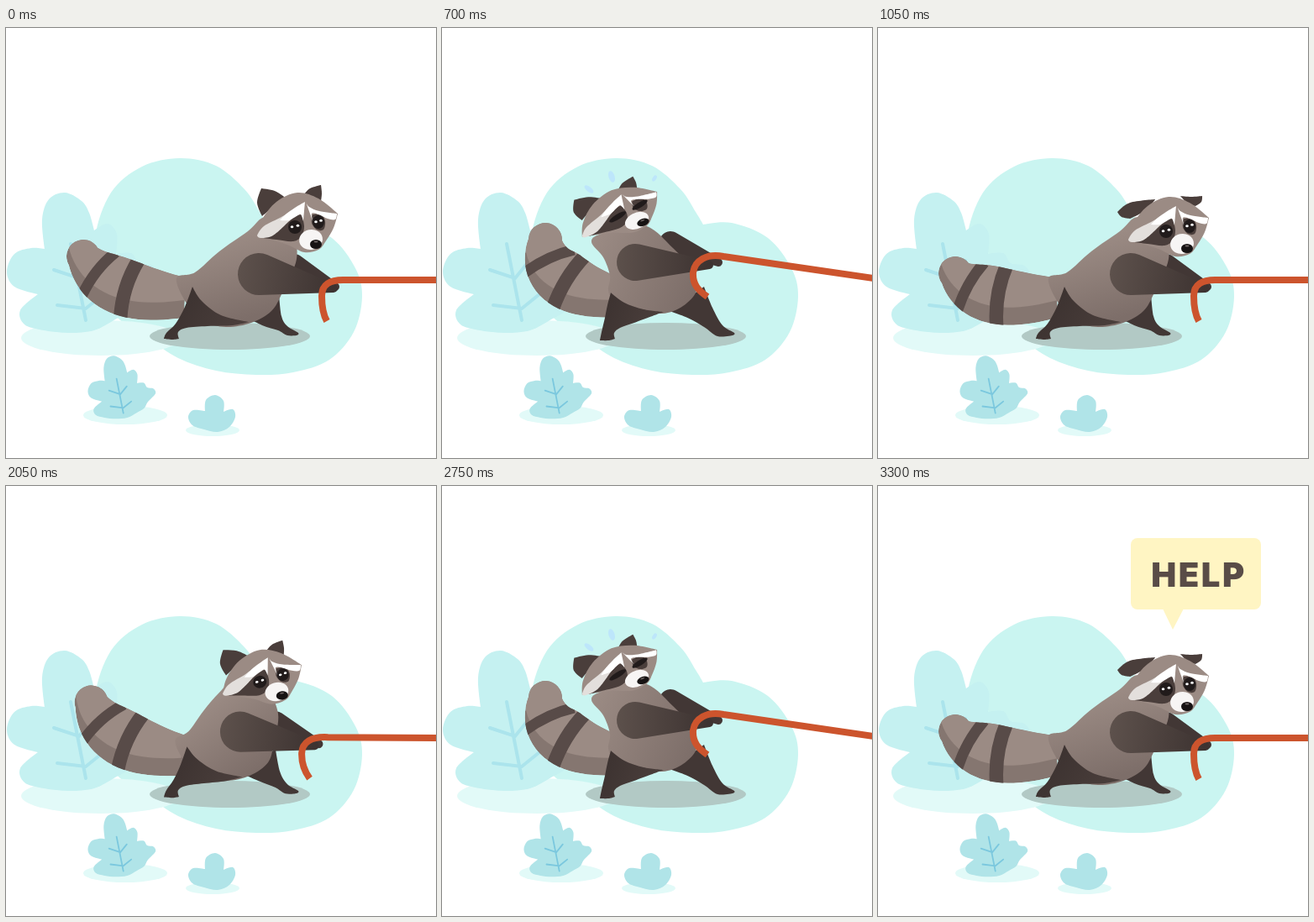
These frames come from a looping animation (512 px wide and 512 px high, 4.3 s). An HTML page with a canvas:

```html
<!DOCTYPE html>
<html lang="en">
<head>
<meta charset="utf-8">
<title>Tug of rope</title>
<style>
html, body { margin: 0; width: 100%; height: 100%; overflow: hidden; background: #fff; }
canvas { display: block; width: 100vw; height: 100vh; }
</style>
</head>
<body>
<canvas id="stage" width="512" height="512"></canvas>
<script>
const SIZE = 512, LOOP = 4300, SECOND_PULL = 2050;
const stage = document.getElementById('stage').getContext('2d');
const layer = document.createElement('canvas');
layer.width = layer.height = SIZE;
const actor = layer.getContext('2d');

const FUR = '#9b8b84', SHADE = '#857670', DARK = '#423735', STRIPE = '#584b48';
const MASK = '#4a3e3b', MIST = '#e2faf8', LEAF = '#b0e4e8', ROPE = '#cc542d';

const clamp = v => Math.max(0, Math.min(1, v));
const lerp = (a, b, t) => a + (b - a) * t;

// "x,y" is a smooth point, "x,y!" a sharp one
const parse = s => s.split(' ').map(w => {
  const [x, y] = w.split(',');
  return { x: parseFloat(x), y: parseFloat(y), sharp: w.endsWith('!') };
});
const poses = (...list) => list.map(parse);
const blend = ([a, b], tx, ty = tx) =>
  a.map((p, i) => ({ x: lerp(p.x, b[i].x, tx), y: lerp(p.y, b[i].y, ty), sharp: p.sharp }));

function spline(pts) {
  const path = new Path2D(), n = pts.length;
  const handle = (i, dir) => {
    const p = pts[i], a = pts[(i + n - 1) % n], b = pts[(i + 1) % n];
    const k = p.sharp ? 0 : dir / 6;
    return [p.x + (b.x - a.x) * k, p.y + (b.y - a.y) * k];
  };
  path.moveTo(pts[0].x, pts[0].y);
  for (let i = 0; i < n; i++) {
    const j = (i + 1) % n;
    path.bezierCurveTo(...handle(i, 1), ...handle(j, -1), pts[j].x, pts[j].y);
  }
  path.closePath();
  return path;
}
function fill(c, pts, color) {
  c.fillStyle = color;
  c.fill(spline(pts));
}
function oval(c, x, y, rx, ry, color, turn = 0) {
  c.fillStyle = color;
  c.beginPath();
  c.ellipse(x, y, rx, ry, turn, 0, Math.PI * 2);
  c.fill();
}
function fade(c, a, b, from, to) {
  const grad = c.createLinearGradient(a.x, a.y, b.x, b.y);
  grad.addColorStop(0, from);
  grad.addColorStop(1, to);
  return grad;
}
// tapered capsule from circle a (radius ra) to circle b (radius rb)
function limb(c, a, ra, b, rb, color) {
  const dir = Math.atan2(b.y - a.y, b.x - a.x);
  const open = Math.acos((ra - rb) / Math.hypot(b.x - a.x, b.y - a.y));
  c.fillStyle = color;
  c.beginPath();
  c.arc(a.x, a.y, ra, dir + open, dir - open);
  c.arc(b.x, b.y, rb, dir - open, dir + open);
  c.fill();
}

// Scenery
const blob = parse('207,155 250,164 284,192 302,219 311,234! 345,232 388,250 416,286 424,320 414,362 385,395 342,410 298,413 250,408 205,393 168,368 130,342 112,300 106,250 125,196 162,165');
const leaf = parse('70,196 90,206 99,220 105,241! 121,233 132,245 131,269! 149,268 158,280 174,283 180,296 160,318 150,335 130,347 105,360 75,363 45,360 22,353 17,336 38,317! 10,308 1,290 10,269 30,262 46,263! 43,228 51,204');
const bud = parse('249,437 259,444 259,457! 270,454 273,463 266,475 252,481 236,478 222,473 217,463 223,455 237,456! 238,443');
const veins = new Path2D('M77 257L95 348M57 288L87 298L104 277M61 330L95 334L116 317');

function drawLeaf(c, x, y, scale, color, veinColor) {
  c.save();
  c.translate(x, y);
  c.scale(scale, scale);
  fill(c, leaf, color);
  c.strokeStyle = veinColor;
  c.lineWidth = 4;
  c.lineCap = 'round';
  c.stroke(veins);
  c.restore();
}
function scenery(c) {
  c.fillStyle = '#fff';
  c.fillRect(0, 0, SIZE, SIZE);
  fill(c, blob, '#caf5f1');
  oval(c, 113, 369, 95, 21, MIST);
  drawLeaf(c, 0, 0, 1, '#c5f1f1', '#abe4ec');
  oval(c, 142, 461, 50, 11, MIST);
  drawLeaf(c, 97, 302, 0.45, LEAF, '#7bc8de');
  oval(c, 246, 479, 32, 7, MIST);
  fill(c, bud, LEAF);
  oval(c, 266.5, 367, 95.5, 16, '#b2c9c5');
}

// Raccoon: each part has a resting and a leaning pose
const spine = poses('92,292 119,328 213,321', '123,252 120,307 208,321');
const body = poses(
  '203,298 225,291 254,266 288,242 310,225 340,245 346,275 329,315 316,337 292,351 262,356 235,349 215,328',
  '198,312 200,295 192,273 178,255 190,245 240,235 275,262 296,287 303,312 287,331 262,340 230,333 204,322');
const nearLeg = poses(
  '222,308! 233,325 256,342 289,350! 270,354 240,355 215,357 205,362 206,370! 198,371 188,370! 191,363 202,352 213,332',
  '201,315! 217,327 240,335 264,338! 245,345 226,352 212,357 205,363 206,370! 199,372 188,372! 190,362 194,345 197,330');
const farLeg = poses(
  '282,342! 300,330 325,316! 328,343 335,355 348,363 346,366! 335,366 324,360 305,354',
  '256,332! 285,325 312,308! 322,333 334,354 348,363 346,366! 328,367 312,356 290,344');
const arms = poses('301,293 390,310 343,282 392,308', '230,279 318,282 272,255 329,279');
const rope = poses(
  '514,300 405,300 385,299 376,306 376,319 376,331 377,340 382,349',
  '514,298 335,272 315,268 301,277 299,291 298,306 306,313 316,320');

// pose: 0 resting, 1 ears up, 2 starting to pull, 3 leaning right back
const lean = pose => pose < 2 ? 0.31 * clamp(pose - 1) : lerp(0.31, 1, pose - 2);

function drawTail(c, pose) {
  const [tip, mid, base] = blend(spine, lean(pose), Math.sin(pose * Math.PI / 6));
  const edge = (t, side) => {
    const u = 1 - t, r = side * (20 + 4 * t + 12 * Math.sin(Math.PI * t));
    const dx = u * (mid.x - tip.x) + t * (base.x - mid.x);
    const dy = u * (mid.y - tip.y) + t * (base.y - mid.y);
    const len = Math.hypot(dx, dy);
    return [
      u * u * tip.x + 2 * u * t * mid.x + t * t * base.x + r * dy / len,
      u * u * tip.y + 2 * u * t * mid.y + t * t * base.y - r * dx / len
    ];
  };
  const path = new Path2D();
  for (let i = 0; i <= 24; i++) path.lineTo(...edge(i / 24, 1));
  for (let i = 24; i >= 0; i--) path.lineTo(...edge(i / 24, -1));
  const start = Math.atan2(edge(0, -1)[1] - tip.y, edge(0, -1)[0] - tip.x);
  path.arc(tip.x, tip.y, 20, start, start + Math.PI);
  path.closePath();

  c.save();
  c.clip(path);
  c.fillStyle = SHADE;
  c.fill(path);
  c.translate(0, -21);
  c.fillStyle = FUR;
  c.fill(path);
  c.translate(0, 21);
  c.strokeStyle = STRIPE;
  for (const t of [0.26, 0.59]) {
    c.lineWidth = 10 + 11 * t;
    c.beginPath();
    c.moveTo(...edge(t, 1.1));
    c.quadraticCurveTo(...edge(t - 0.07, 0), ...edge(t, -1.1));
    c.stroke();
  }
  c.restore();
}

// Head, drawn upright and then sheared into the lean
const ears = [
  poses('301,222! 291,220 286,214! 301,203 331,199! 320,212', '305,224! 299,208 304,191! 320,194 334,203! 320,212'),
  poses('361,195! 374,196 387,195! 386,202 379,207! 370,204', '355,198! 362,191 375,187! 376,197 375,206! 366,204')
];
const face = [
  [FUR, '299,248! 305,228 322,207 347,196 372,203 395,221! 390,238 380,255 372,264 355,267 335,258 315,252'],
  [MASK, '352,222! 342,225 333,232 325,240 306,250! 322,252 342,254 352,248 355,236'],
  [MASK, '365,222! 375,222 380,230 378,240 370,240 364,232'],
  ['#e3dfdc', '340,217! 328,225 307,236 299,247! 303,250 318,247 336,231! 345,222'],
  ['#ffffff', '356,207! 344,214 333,222 326,229! 337,229 346,224 351,222 354,230!'],
  ['#ffffff', '357,207! 361,213 373,218 394,221! 392,228 383,227 372,222 364,221 366,232!']
].map(([color, pts]) => [color, parse(pts)]);

function drawEye(c, x, y, rx, open) {
  const shut = 1 - open;
  oval(c, x, y, rx + 3 * shut, 8 - 4 * shut, '#211b1b', -0.3 * shut);
  c.globalAlpha = open;
  for (const side of [-1, 1]) oval(c, x + side * rx * 0.43, y - 1 - side * 0.8, 1.8, 1.5, '#fff');
  c.globalAlpha = 1;
}
function drawHead(c, pose) {
  const p = lean(pose), droop = 1 - clamp(pose), open = clamp(3 - pose);
  c.save();
  c.translate(lerp(299, 167, p) - droop, lerp(248, 249, p) + 5 * droop);
  c.transform(1, -0.353 * p, 0.257 * p, 1 - 0.255 * p, 0, 0);
  c.translate(-299, -248);
  for (const ear of ears) fill(c, blend(ear, 1 - droop), MASK);
  for (const [color, pts] of face) fill(c, pts, color);
  oval(c, 363, 252, 14, 12, '#f7f5f4', -0.2);
  drawEye(c, 344, 237, 8, open);
  drawEye(c, 372, 231, 7, open);
  oval(c, 369, 257.5, 7, 5.5, '#171313');
  oval(c, 369, 254.5, 2.5, 1, '#716866');
  c.restore();
}

function drawRaccoon(c, pose) {
  const p = lean(pose);
  const [shoulder, hand, farShoulder, farHand] = blend(arms, p, p ** 3);
  const trunk = blend(body, p), leg = blend(nearLeg, p);
  c.clearRect(0, 0, SIZE, SIZE);
  drawTail(c, pose);
  fill(c, blend(farLeg, p), DARK);
  limb(c, farShoulder, 13, farHand, 5, DARK);
  fill(c, trunk, fade(c, trunk[3], trunk[8], FUR, '#7d6e69'));
  fill(c, leg, fade(c, leg[0], leg[3], '#3d3331', '#4b3f3c'));
  limb(c, shoulder, lerp(25, 22, p), hand, 5, fade(c, { x: shoulder.x - 25, y: shoulder.y }, hand, '#5d514c', '#3d3331'));
  drawHead(c, pose);
}

function drawRope(c, pose) {
  const p = lean(pose), r = blend(rope, p, p ** 3);
  c.strokeStyle = ROPE;
  c.lineWidth = 8;
  c.lineCap = 'butt';
  c.beginPath();
  c.moveTo(r[0].x, r[0].y);
  c.lineTo(r[1].x, r[1].y);
  for (const i of [2, 5]) c.bezierCurveTo(r[i].x, r[i].y, r[i + 1].x, r[i + 1].y, r[i + 2].x, r[i + 2].y);
  c.stroke();
}

function drawSweat(c, amount) {
  c.save();
  c.globalAlpha = amount;
  c.translate(0, 8 * (1 - amount));
  oval(c, 175, 192, 3, 6.5, '#bde6fb', -0.9);
  oval(c, 202, 177, 3.6, 7, '#bde6fb', -0.3);
  oval(c, 253, 179, 2.2, 4, '#bde6fb', 0.6);
  c.restore();
}

function drawBubble(c, scale) {
  c.save();
  c.translate(351, 171);
  c.scale(scale, scale);
  c.translate(-351, -171);
  c.fillStyle = '#fff5c3';
  c.beginPath();
  c.roundRect(301, 62, 155, 85, 8);
  c.fill();
  c.fill(new Path2D('M339 146H364L351 171Z'));
  c.fillStyle = '#594c47';
  c.font = '900 40px Inter, "Open Sans", sans-serif';
  c.letterSpacing = '2.5px';
  c.textAlign = 'center';
  c.fillText('HELP', 382, 120);
  c.restore();
}

// Motion is held on these ticks of each pull
const ticks = [0, 100, 200, 250, 300, 400, 600, 700, 900, 950, 1000, 1050, 1150, 1250];

function poseAt(u, from) {
  if (u < 400) return 3 - (3 - from) * (1 - u / 400) ** 3;
  if (u < 900) return u === 600 ? 3.03 : 3;
  return 3 * (1 - clamp((u - 850) / 200));
}

function render(time) {
  const again = time >= SECOND_PULL;
  const local = time - (again ? SECOND_PULL : 0);
  const u = ticks.findLast(t => t <= local);
  const pose = poseAt(u, again ? 2 : 1);
  const moving = (u > 100 && u < 300) || (u >= 900 && u < 1000);
  const sweat = u < 900 ? clamp((u - 300) / 400) : 0;
  const bubble = again ? clamp((u - 1050) / 200) : 0;

  scenery(stage);
  drawRaccoon(actor, pose);
  stage.filter = moving ? 'blur(1.1px)' : 'none';
  stage.drawImage(layer, 0, 0);
  stage.filter = 'none';
  drawRope(stage, pose);
  if (sweat) drawSweat(stage, sweat);
  if (bubble) drawBubble(stage, bubble);
}

const start = performance.now();
function tick() {
  render(Math.max(0, performance.now() - start) % LOOP);
  requestAnimationFrame(tick);
}
tick();
</script>
</body>
</html>
```
